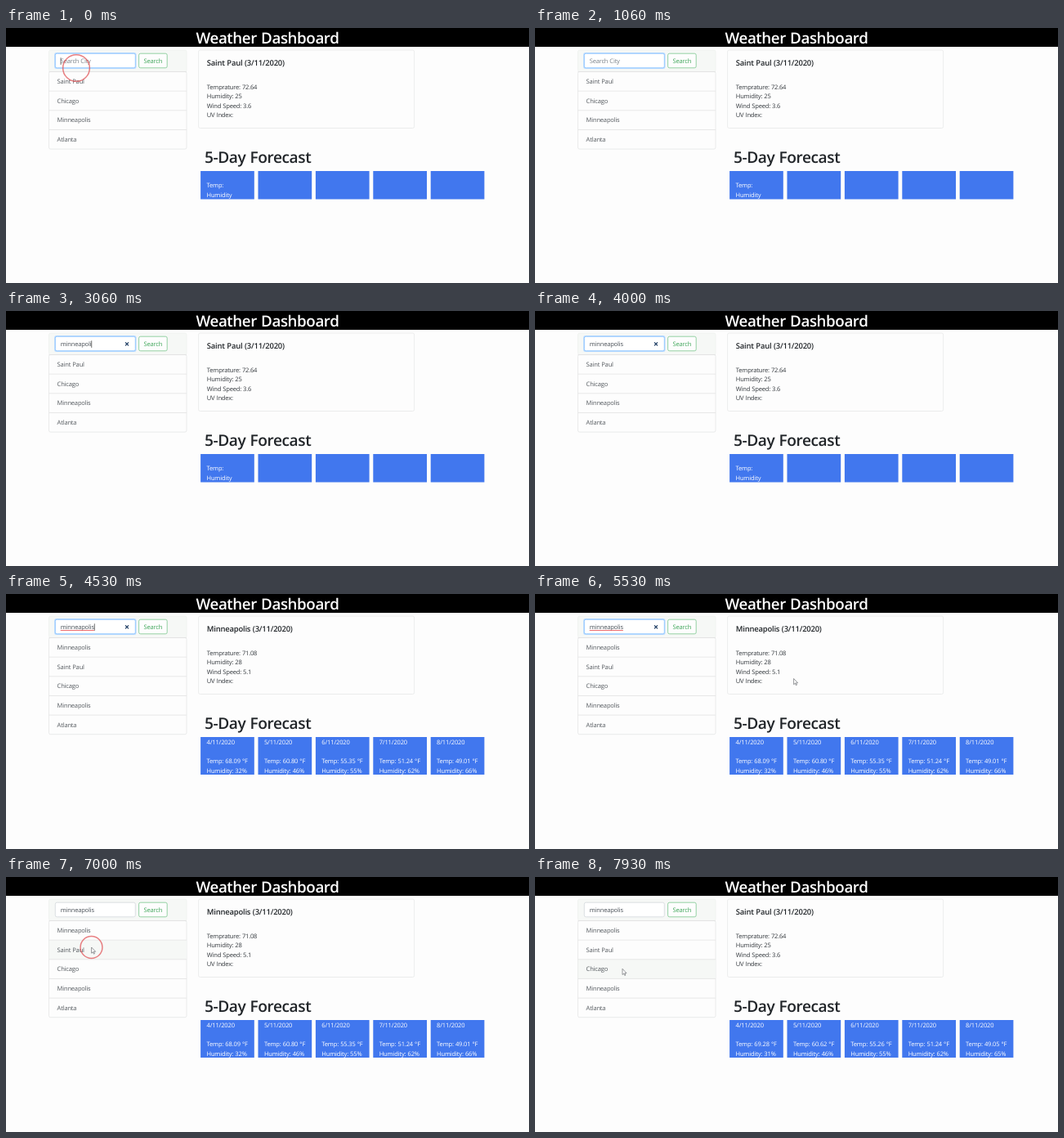
An HTML page for the animation above (8000 ms loop, 640 by 312 pixels).

```html
<!DOCTYPE html>
<html lang="en">
<head>
<meta charset="utf-8">
<title>Weather Dashboard</title>
<style>
  html, body { margin: 0; width: 100%; height: 100%; overflow: hidden; background: #fdfdfd; }
  svg { display: block; width: 640px; height: 312px; }
  text {
    font: 7.55px "Open Sans", "Noto Sans", sans-serif;
    letter-spacing: -.025em;
    word-spacing: .04em;
    text-rendering: geometricPrecision;
    fill: #33383d;
    white-space: pre;
  }
  .h1, .h5 { font-weight: 600; letter-spacing: -.022em; fill: #212529; }
  .h1 { font-size: 19.1px; }
  .h5 { font-size: 9.45px; }
  .title { font-size: 18.75px; fill: #fff; text-anchor: middle; }
  .item { fill: #555a5f; }
  .word { fill: #495057; }
  .hint { fill: #7a828a; }
  .go { fill: #3fa65a; }
  .card { font-size: 7.5px; letter-spacing: -.018em; fill: #fff; }
</style>
</head>
<body>
<svg id="stage" viewBox="0 0 640 312"></svg>
<script>
const LOOP = 8000, RESULT = 4260, BLUR = 6860, RELOAD = 7130;
const ROW = 23.65, LIST_TOP = 53.5, BLINK = 533;
const WORD = "minneapolis", WORD_X = 66.7;
const KEYS = [1330, 1430, 1530, 1730, 2130, 2330, 2430, 2530, 2800, 3060, 3460];
const CITIES = ["Saint Paul", "Chicago", "Minneapolis", "Atlanta"];

const STPAUL = { city: "Saint Paul", now: ["72.64", 25, "3.6"],
  temps: ["69.28", "60.62", "55.26", "51.24", "49.05"], hums: [31, 46, 55, 62, 65] };
const MINNEAPOLIS = { city: "Minneapolis", now: ["71.08", 28, "5.1"],
  temps: ["68.09", "60.80", "55.35", "51.24", "49.01"], hums: [32, 46, 55, 62, 66] };

// pointer stops: time, x, y
const PATH = [[5000, 86, 49], [5530, 316.6, 103.5], [5800, 330, 146], [6060, 330, 146],
  [6400, 106, 87], [6660, 106, 87], [6730, 104.6, 86], [7640, 104.6, 86], [7930, 107, 112.3]];
// clicks: start, end, x, y
const CLICKS = [[-210, 330, 86, 49], [BLUR, 7130, 104.5, 86]];

const stage = document.getElementById("stage");
const text = (x, y, s, cls = "") => `<text x="${x}" y="${y}" class="${cls}">${s}</text>`;
const rect = (x, y, w, h, fill, stroke = "none", r = 0) =>
  `<rect x="${x}" y="${y}" width="${w}" height="${h}" rx="${r}" fill="${fill}" stroke="${stroke}" stroke-width=".8"/>`;
const line = (x1, x2, y, color, w = .8) =>
  `<path d="M${x1} ${y}H${x2}" stroke="${color}" stroke-width="${w}"/>`;

function pointer(t) {
  if (t < PATH[0][0]) return null;
  const i = PATH.findIndex(p => p[0] > t);
  if (i < 0) return PATH[PATH.length - 1].slice(1);
  const [t0, x0, y0] = PATH[i - 1], [t1, x1, y1] = PATH[i];
  const u = (t - t0) / (t1 - t0), e = u * u * (3 - 2 * u);
  return [x0 + (x1 - x0) * e, y0 + (y1 - y0) * e];
}

function search(t) {
  const typed = KEYS.filter(k => k <= t).length, focus = t < BLUR;
  let s = rect(52.5, 27, 168.5, 26.5, "#f6f8f6", "#eff1ef", 2);
  if (focus) s += rect(59.1, 30, 100.4, 20, "#bfdeff", "none", 2.5);
  s += rect(60.3, 31.2, 98, 17.6, "#fff", focus ? "#80bdff" : "#d3d8dc", 2);
  s += typed ? text(WORD_X, 43, WORD.slice(0, typed), "word")
             : text(WORD_X, 43, "Search City", "hint");
  if (focus && typed)
    s += `<path d="M146 38.4l4 4m0-4l-4 4" stroke="#1d3c63" stroke-width="1.3"/>`;
  s += rect(162.6, 31.2, 34.6, 17.6, "#fdfdfd", "#7cc78e", 2);
  return s + text(168.6, 43, "Search", "go");
}

function list(t, pos) {
  const rows = t < RESULT ? CITIES : ["Minneapolis", ...CITIES];
  const over = pos && pos[0] > 52 && pos[0] < 221 ? Math.floor((pos[1] - LIST_TOP) / ROW) : -1;
  let s = rect(52.5, LIST_TOP, 168.5, rows.length * ROW, "#fdfdfd", "#e5e6e6", 2);
  rows.forEach((name, i) => {
    const y = LIST_TOP + i * ROW;
    if (i === over) s += rect(52.9, y, 167.7, ROW, "#f6f8f6");
    s += line(52.5, 221, y, "#e2e3e3") + text(62.6, y + 14.4, name, "item");
  });
  return s;
}

function weather(d) {
  const [temp, hum, wind] = d.now;
  const rows = ["Temprature: " + temp, "Humidity: " + hum, "Wind Speed: " + wind, "UV Index:"];
  return rect(235.6, 27, 264, 95.5, "#fdfdfd", "#e8e9e9", 2)
    + text(245.8, 46.4, `${d.city} (3/11/2020)`, "h5")
    + rows.map((s, i) => text(245.8, 74.6 + i * 11.6, s)).join("");
}

function forecast(t, d) {
  const loaded = t >= RESULT;
  let s = text(243, 164.6, "5-Day Forecast", "h1");
  for (let i = 0; i < 5; i++) {
    const x = 238.1 + i * 70.4, tx = x + 7.4;
    s += rect(x, 175, 65.7, loaded ? 46 : 34.5, "#4177ee");
    if (loaded)
      s += text(tx, 183.7, `${i + 4}/11/2020`, "card")
        + text(tx, 206.9, `Temp: ${d.temps[i]} °F`, "card")
        + text(tx, 218.5, `Humidity: ${d.hums[i]}%`, "card");
    else if (!i)
      s += text(tx, 195.2, "Temp:", "card") + text(tx, 206.8, "Humidity", "card");
  }
  return s;
}

// caret and spelling line follow the measured text
function marks(t) {
  if (t >= BLUR) return "";
  const word = stage.querySelector(".word");
  const end = WORD_X + (word ? word.getComputedTextLength() : 0);
  const last = KEYS.filter(k => k <= t).pop() || 0;
  const on = Math.floor((t - last) / BLINK) % 2 === 0;
  return (on ? rect(end, 36.3, .7, 8.6, "#333") : "")
    + (t >= RESULT ? line(WORD_X, end, 44.5, "#e8484c") : "");
}

function ripple(t) {
  return CLICKS.filter(c => t >= c[0] && t < c[1]).map(([a, b, x, y]) => {
    const r = 7.5 + (t - a) * .042, fade = Math.min(1, (b - t) / 130);
    return `<circle cx="${x}" cy="${y}" r="${r}" fill="none" stroke="#e04a4e" stroke-width="1.5" opacity="${.7 * fade}"/>`;
  }).join("");
}

const arrow = ([x, y]) =>
  `<path transform="translate(${x} ${y})" d="M0 0V7.2L1.7 5.7L2.8 8.2L3.9 7.7L2.8 5.3H5Z" fill="#fff" stroke="#6a6d72" stroke-width=".7"/>`;

function draw(t) {
  const pos = pointer(t);
  const data = t >= RESULT && t < RELOAD ? MINNEAPOLIS : STPAUL;
  stage.innerHTML = rect(0, 0, 640, 312, "#fdfdfd") + rect(0, 0, 640, 23, "#000")
    + text(320, 19.2, "Weather Dashboard", "h1 title")
    + search(t) + list(t, pos) + weather(data) + forecast(t, data);
  stage.insertAdjacentHTML("beforeend", marks(t) + ripple(t) + (pos ? arrow(pos) : ""));
}

const start = performance.now();
function tick() {
  draw((performance.now() - start) % LOOP);
  requestAnimationFrame(tick);
}
tick();
</script>
</body>
</html>
```
